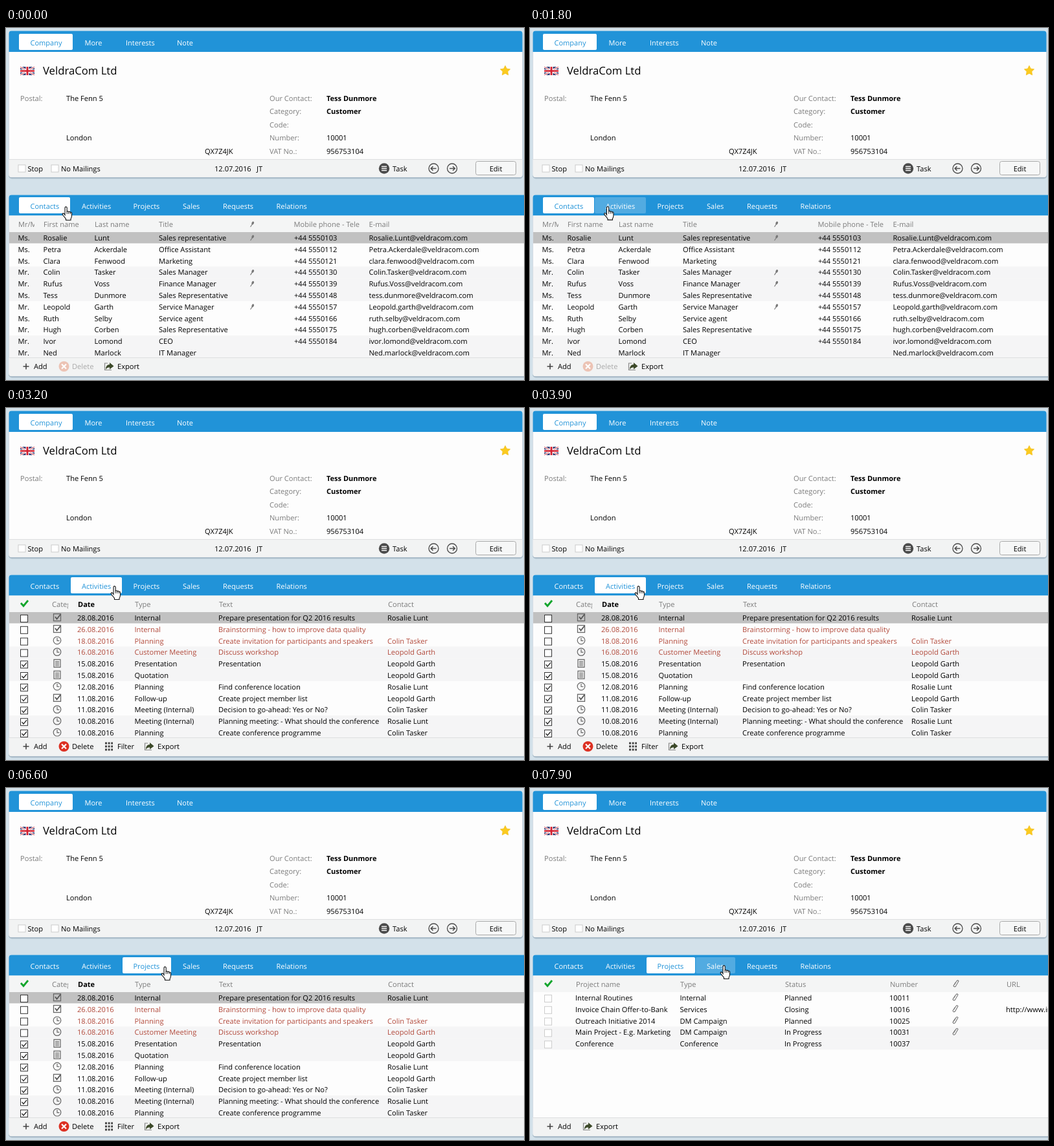
Write an HTML page that moves like this. It is 800 by 545 pixels and loops after 8 s.

```html
<!DOCTYPE html>
<html lang="en">
<head>
<meta charset="utf-8">
<title>Company card</title>
<style>
html, body { margin: 0; width: 100%; height: 100%; overflow: hidden; background: #d3e1ea; }
svg { display: block; }
text { font: 11.1px "Open Sans", "Noto Sans", sans-serif; text-rendering: geometricPrecision; white-space: pre; }
.tab { font-size: 11px; }
.bold { font-size: 11px; font-weight: 700; }
.title { font-size: 16.7px; }
</style>
</head>
<body>
<svg id="stage" width="800" height="545"></svg>
<script>
const BLUE = '#2193d8', INK = '#000', GREY = '#7c7c7c', RED = '#b24a3c';
const LOOP = 8000;

const rect = (x, y, w, h, fill, more = '') =>
  `<rect x="${x}" y="${y}" width="${w}" height="${h}" fill="${fill}" ${more}/>`;
const path = (d, stroke, width = 1, more = '') =>
  `<path d="${d}" fill="none" stroke="${stroke}" stroke-width="${width}" ${more}/>`;
const disc = (x, y, r, fill, more = '') =>
  `<circle cx="${x}" cy="${y}" r="${r}" fill="${fill}" ${more}/>`;
const at = (x, y, body) => `<g transform="translate(${x} ${y})">${body}</g>`;
// y is the middle of the capitals; baselines sit on whole pixels
const text = (x, y, s, fill = INK, more = '') =>
  `<text x="${x}" y="${Math.round(y + 4)}" fill="${fill}" ${more}>${s}</text>`;
const clipped = (x, y, w, s, fill) =>
  `<svg x="${x}" y="${Math.round(y) - 9}" width="${w}" height="18">${text(0, 9, s, fill)}</svg>`;
const bold = 'class="bold"';

// Icons, centred on 0,0
const box = (line, ticked) => rect(-5.5, -5.5, 11, 11, '#fff', `stroke="${line}"`) +
  (ticked ? path('M-3.5 0L-1 3L4-3', '#222', 1.3) : '');
const icons = {
  check: rect(-5.5, -5.5, 11, 11, 'none', 'stroke="#666" stroke-width="1.3"') + path('M-3-1L-.5 2.5L5-4.5', '#555', 1.8),
  clock: disc(0, 0, 5.8, 'none', 'stroke="#666" stroke-width="1.2"') + path('M0-4V.5H3.5', '#666', 1.2),
  doc: rect(-5, -6, 10, 12, '#eee', 'stroke="#666" stroke-width="1.2"') + path('M-3-3H3M-3-.8H3M-3 1.4H3M-3 3.6H3', '#666'),
  pin: path('M-2.5 4L1.5-2', '#777', 1.1) + '<ellipse cx="1.2" cy="-2" rx="1.7" ry="2.6" fill="#777" transform="rotate(25 1 -2)"/>',
  clip: path('M-2.5 1.5L1.2-4.5Q3-6 4-4L-.5 4Q-3 6-4 3L-.5-2.5', '#777', 1.1),
  tick: path('M-5.5-.5L-1.5 4L5.5-4.5', '#12a52c', 2.8),
  add: path('M-4.5 0H4.5M0-4.5V4.5', '#444', 1.6),
  filter: path('M-6-5H6M-6 0H6M-6 5H6', '#444', 3, 'stroke-dasharray="3 1.6"'),
  export: path('M-2-5H-6.5V5.5H4', '#888', 1.2) +
    '<path d="M-5 5Q-5-3 1-3V-6L7.5-.5L1 4.5V1.5Q-3 1-5 5Z" fill="#3d4a2a"/>',
};
const remove = color => disc(0, 0, 8, color) + path('M-3.5-3.5L3.5 3.5M3.5-3.5L-3.5 3.5', '#fff', 2.2);

const rowY = i => 325 + 17.8 * i;

function grid(count, selected) {
  let s = '';
  for (let i = 0; i < count; i++)
    if (Math.floor(i / 3) % 2) s += rect(5, rowY(i) - 9, 795, 17.9, '#f5f5f6');
  return s + (selected ? rect(5, 316, 795, 17.4, '#c1c1c1') : '');
}

function panel(top, right, bottom, head) {
  return rect(4, top + 1, right - 3, bottom - top + 1.5, '#9fb2bf', 'rx="5" opacity=".75"') +
    rect(4.5, top, right - 4.5, bottom - top, '#fdfdfd', 'rx="4"') +
    `<path d="M4.5 ${head}V${top + 4}q0-4 4-4H${right - 4}q4 0 4 4V${head}Z" fill="${BLUE}"/>`;
}
const footer = (top, right, bottom) =>
  `<path d="M4.5 ${top}H${right}V${bottom - 4}q0 4-4 4H8.5q-4 0-4-4Z" fill="#f2f3f3"/>` +
  path(`M4.5 ${top + .5}H${right}`, '#dedfe0');

function companyCard() {
  const diagonals = 'M0 0L22 14M22 0L0 14', cross = 'M11 0V14M0 7H22';
  const flag = `<svg x="22" y="60" width="22" height="13" viewBox="0 0 22 14" preserveAspectRatio="none">` +
    rect(0, 0, 22, 14, '#27346f') + path(diagonals, '#fff', 3) + path(diagonals, '#cf2f3c', 1) +
    path(cross, '#fff', 5) + path(cross, '#d3202f', 2.8) + '</svg>';
  let star = '';
  for (let i = 0; i < 10; i++) {
    const r = i % 2 ? 4 : 8, a = i * Math.PI / 5;
    star += `${771 + r * Math.sin(a)},${66.3 - r * Math.cos(a)} `;
  }
  let s = panel(4.5, 797.5, 231, 37) + footer(203, 797.5, 231) + rect(20, 9, 83, 25, '#fff', 'rx="2"');
  [[37.5, 'Company'], [121.5, 'More'], [185, 'Interests'], [264, 'Note']].forEach(([x, name], i) =>
    s += text(x, 22.5, name, i ? '#fff' : BLUE, 'class="tab"'));
  s += flag + text(57, 68, 'VeldraCom Ltd', INK, 'class="title"') +
    `<polygon points="${star}" fill="#fbcb20" stroke="#f3bf1c" stroke-width=".8" stroke-linejoin="round"/>`;
  s += text(22, 108.5, 'Postal:', GREY) + text(93, 108.5, 'The Fenn 5') +
    text(93, 170, 'London') + text(307, 190.5, 'QX7Z4JK');
  [['Our Contact:', 'Tess Dunmore', bold], ['Category:', 'Customer', bold], ['Code:', ''],
   ['Number:', '10001'], ['VAT No.:', '956753104']].forEach(([label, value, style], i) => {
    const y = 108.5 + 20.5 * i;
    s += text(407, y, label, GREY) + text(495, y, value, INK, style);
  });
  s += at(24.5, 217.5, box('#ccc')) + text(33.5, 218, 'Stop') +
    at(75.5, 217.5, box('#ccc')) + text(85, 218, 'No Mailings') +
    text(322, 218, '12.07.2016') + text(387, 218, 'JT') +
    disc(584, 217.5, 8.2, '#4b4b4b') + path('M580 214.5H588M580 217.5H588M580 220.5H588', '#fff', 1.5) +
    text(597, 218, 'Task');
  [[660.5, 1], [689, -1]].forEach(([x, dir]) => s += at(x, 217.5,
    disc(0, 0, 7.5, 'none', 'stroke="#4b4b4b" stroke-width="1.3"') +
    path(`M${4 * dir} 0H${-4 * dir}M${-dir} -3.3L${-4.3 * dir} 0L${-dir} 3.3`, '#4b4b4b', 1.5)));
  return s + rect(725.5, 206.5, 62, 21, '#f6f7f7', 'rx="3" stroke="#a9a9a9"') +
    text(756.5, 217.5, 'Edit', INK, 'text-anchor="middle"');
}

const addButton = at(31, 524, icons.add) + text(43, 524, 'Add');
const exportButton = x => at(x, 524, icons.export) + text(x + 13, 524, 'Export');
const deleteButton = (color, ink) => at(89.5, 524, remove(color)) + text(102, 524, 'Delete', ink);
const listFooter = footer(510, 804, 539) + addButton;

function contactsView() {
  const people = [
    'Ms.|Rosalie|Lunt|Sales representative', 'Ms.|Petra|Ackerdale|Office Assistant',
    'Ms.|Clara|Fenwood|Marketing', 'Mr.|Colin|Tasker|Sales Manager',
    'Mr.|Rufus|Voss|Finance Manager', 'Ms.|Tess|Dunmore|Sales Representative',
    'Mr.|Leopold|Garth|Service Manager', 'Ms.|Ruth|Selby|Service agent',
    'Mr.|Hugh|Corben|Sales Representative', 'Mr.|Ivor|Lomond|CEO', 'Mr.|Ned|Marlock|IT Manager'];
  let s = grid(11, true) + clipped(19, 304, 25, 'Mr/Mrs', GREY) + text(58, 304, 'First name', GREY) +
    text(137, 304, 'Last name', GREY) + text(236, 304, 'Title', GREY) + at(380, 304, icons.pin) +
    clipped(444.5, 304, 101.5, 'Mobile phone - Telephone', GREY) + text(560.5, 304, 'E-mail', GREY);
  people.forEach((line, i) => {
    const y = rowY(i), [prefix, first, last, title] = line.split('|');
    let mail = `${first}.${last}`;
    if ([2, 5, 7, 8, 9].includes(i)) mail = mail.toLowerCase();
    if (i === 6 || i === 10) mail = `${first}.${last.toLowerCase()}`;
    s += text(18.5, y, prefix) + text(57.5, y, first) + text(136.5, y, last) + text(236, y, title) +
      text(560.5, y, mail + '@veldracom.com');
    if (i < 10) s += text(445, y, `+44 ${5550103 + 9 * i}`);
    if ([0, 3, 4, 6].includes(i)) s += at(380, y, icons.pin);
  });
  return s + listFooter + deleteButton('#ecc3b4', '#aaa') + exportButton(159);
}

function activitiesView() {
  const [a, b, c] = ['Rosalie Lunt', 'Colin Tasker', 'Leopold Garth'];
  const rows = [
    ['check', 28, 'Internal', 'Prepare presentation for Q2 2016 results', a],
    ['check', 26, 'Internal', 'Brainstorming - how to improve data quality', ''],
    ['clock', 18, 'Planning', 'Create invitation for participants and speakers', b],
    ['clock', 16, 'Customer Meeting', 'Discuss workshop', c],
    ['doc', 15, 'Presentation', 'Presentation', c],
    ['doc', 15, 'Quotation', '', c],
    ['clock', 12, 'Planning', 'Find conference location', a],
    ['check', 11, 'Follow-up', 'Create project member list', c],
    ['clock', 11, 'Meeting (Internal)', 'Decision to go-ahead: Yes or No?', b],
    ['clock', 10, 'Meeting (Internal)', 'Planning meeting: - What should the conference', a],
    ['clock', 10, 'Planning', 'Create conference programme', b]];
  let s = grid(11, true) + at(28.5, 302.5, icons.tick) + clipped(71, 304, 25, 'Category', GREY) +
    text(111, 304, 'Date', INK, bold) + text(199, 304, 'Type', GREY) +
    text(329, 304, 'Text', GREY) + text(590, 304, 'Contact', GREY);
  rows.forEach(([icon, day, type, note, who], i) => {
    const y = rowY(i), ink = i > 0 && i < 4 ? RED : INK;
    s += at(28, y + 1, box('#333', i > 3)) + at(79, y - .8, icons[icon]) +
      text(110, y, `${day}.08.2016`, ink) + text(198.5, y, type, ink) +
      clipped(328, y, 249, note, ink) + text(589, y, who, ink);
  });
  return s + listFooter + deleteButton('#dc3022', INK) + at(159, 524, icons.filter) +
    text(172, 524, 'Filter') + exportButton(221);
}

function projectsView() {
  const rows = [
    ['Internal Routines', 'Internal', 'Planned', 10011],
    ['Invoice Chain Offer-to-Bank', 'Services', 'Closing', 10016],
    ['Outreach Initiative 2014', 'DM Campaign', 'Planned', 10025],
    ['Main Project - E.g. Marketing', 'DM Campaign', 'In Progress', 10031],
    ['Conference', 'Conference', 'In Progress', 10037]];
  let s = grid(5) + at(28.5, 302.5, icons.tick) + at(658, 303, icons.clip);
  [[71, 'Project name'], [232, 'Type'], [394, 'Status'], [556, 'Number'], [736, 'URL']].forEach(([x, name]) =>
    s += text(x, 304, name, GREY));
  rows.forEach(([name, type, status, number], i) => {
    const y = rowY(i);
    s += at(28, y + 1, box('#ccc')) + clipped(70, y, 148.5, name) + text(231.5, y, type) +
      text(393, y, status) + text(555, y, number);
    if (i < 4) s += at(657, y - 1, icons.clip);
  });
  return s + text(735, rowY(1), 'http://www.internal') + listFooter + exportButton(89);
}

// left, right, label x, label
const tabs = [[20, 99, 37.5, 'Contacts'], [100, 179, 117, 'Activities'], [180, 255, 196.5, 'Projects'],
  [256, 317, 273, 'Sales'], [318, 399, 335, 'Requests'], [400, 482, 417.5, 'Relations']];

const hand = `<path d="M4.5 13V2a1.6 1.6 0 0 1 3.2 0V7.5q1.6-.8 2.6.6q1.7-.7 2.6.7q2-.4 2.1 1.4V14q0 3-1.5 5V21H6V19L1 12.8q-1-2 .8-2.4q1.2 0 2.7 2.6Z" fill="#fff" stroke="#111" stroke-width="1.1"/>` +
  path('M7.7 7.5V11.5M10.3 8.1V11.5M12.9 8.8V11.5', '#111', .9);

const stage = document.getElementById('stage');
stage.innerHTML = rect(0, 0, 800, 545, '#d3e1ea') + companyCard() + panel(258.5, 804, 539, 290.5) +
  rect(5, 290.5, 795, 25.5, '#f4f5f5') +
  tabs.map(([l, r, x, name]) => `<g class="t">${rect(l, 262, r - l, 25, '#fff', 'rx="2"')}${text(x, 275.5, name, '#fff', 'class="tab"')}</g>`).join('') +
  [contactsView, activitiesView, projectsView].map(view => `<g class="view">${view()}</g>`).join('') +
  `<g id="hand">${hand}</g>`;

const tabNodes = [...stage.querySelectorAll('.t')];
const views = [...stage.querySelectorAll('.view')];
const handNode = document.getElementById('hand');

// time, x, y of the pointer's middle
const route = [[0, 93, 287], [1500, 93, 287], [2300, 166, 286], [2800, 168, 286], [4700, 168, 286],
  [5200, 192, 286.5], [5900, 246, 287], [7100, 246, 287], [7800, 300, 285], [LOOP, 300, 285]];
const step = (t, first, second) => (t >= first) + (t >= second);

function pointer(t) {
  const i = route.findIndex(p => p[0] > t), [t0, x0, y0] = route[i - 1], [t1, x1, y1] = route[i];
  const k = (t - t0) / (t1 - t0);
  return [x0 + (x1 - x0) * k, y0 + (y1 - y0) * k];
}

function draw(now) {
  const t = now % LOOP, [x, y] = pointer(t);
  const active = step(t, 3000, 6500), shown = step(t, 3200, 6750);
  tabNodes.forEach((node, i) => {
    const [back, label] = node.children, hover = x - 2 >= tabs[i][0] && x - 2 < tabs[i][1];
    back.setAttribute('opacity', i === active ? 1 : hover ? .22 : 0);
    label.setAttribute('fill', i === active ? BLUE : '#fff');
  });
  views.forEach((view, i) => view.setAttribute('display', i === shown ? 'inline' : 'none'));
  handNode.setAttribute('transform', `translate(${x - 6.5} ${y - 10.5})`);
  requestAnimationFrame(() => draw(performance.now()));
}
draw(performance.now());
</script>
</body>
</html>
```
